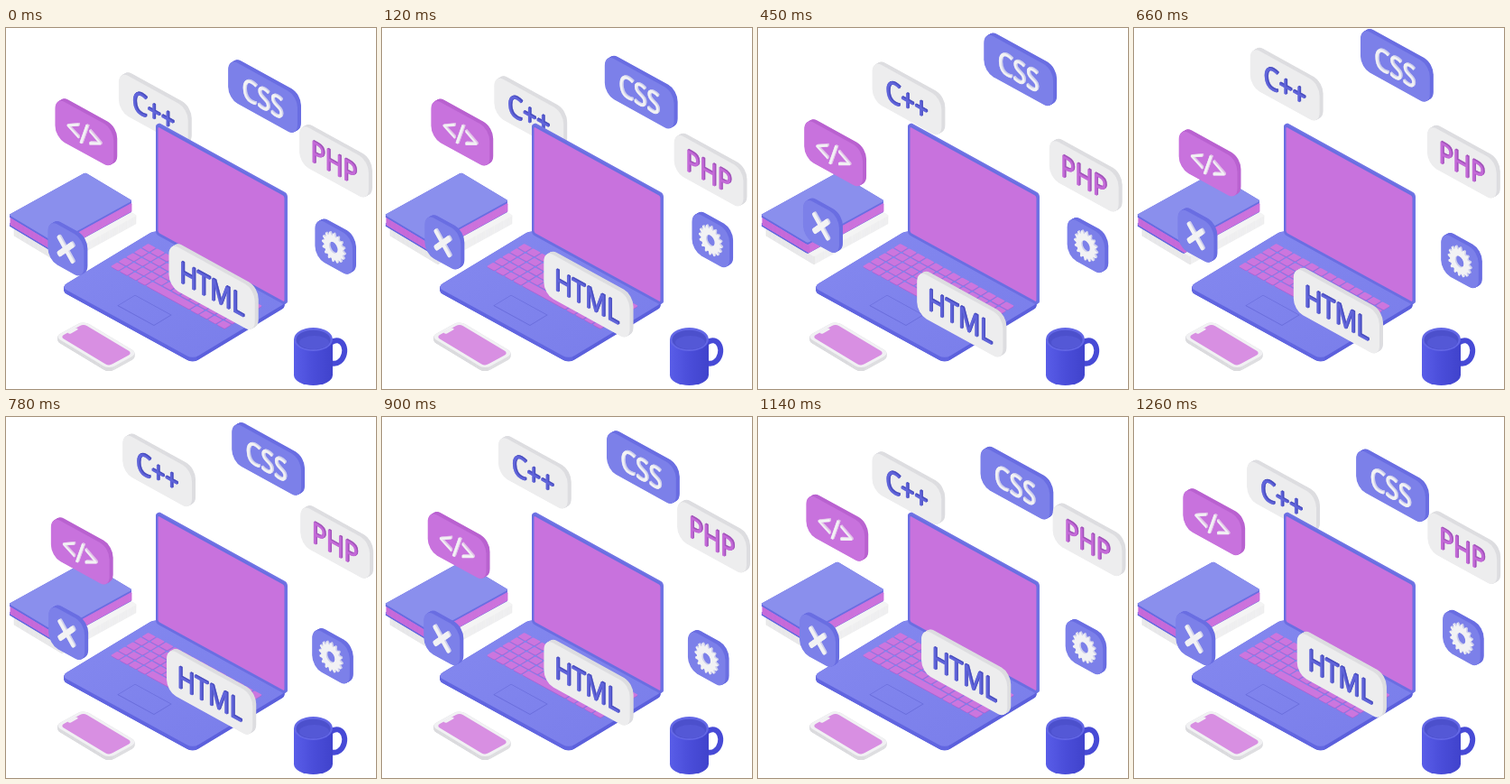
Recreate the animation shown at these times as an HTML page with a canvas. Size 410 by 400 pixels, loop 1290 ms.

```html
<!DOCTYPE html>
<html lang="en">
<head>
<meta charset="utf-8">
<title>Coding desk</title>
<style>
html, body { margin: 0; width: 100%; height: 100%; overflow: hidden; background: #fff; }
canvas { display: block; width: 410px; height: 400px; }
</style>
</head>
<body>
<canvas id="stage" width="410" height="400"></canvas>
<script>
const ctx = document.getElementById('stage').getContext('2d');
const LOOP = 1290, STEP = 30, TURN = Math.PI * 2;
const BLUE = '#7c80e9', BLUE_EDGE = '#6a6ee2', PINK = '#c872dd', WHITE = '#ededee';

function box(x, y, w, h, radius, fill) {
  ctx.beginPath();
  ctx.roundRect(x, y, w, h, radius);
  ctx.fillStyle = fill;
  ctx.fill();
}

function ellipse(x, y, rx, ry, fill) {
  ctx.beginPath();
  ctx.ellipse(x, y, rx, ry, 0, 0, TURN);
  ctx.fillStyle = fill;
  ctx.fill();
}

function blend(x0, x1, ...colors) {
  const gradient = ctx.createLinearGradient(x0, 0, x1, 0);
  colors.forEach((color, i) => gradient.addColorStop(i / (colors.length - 1), color));
  return gradient;
}

function within(matrix, draw) {
  ctx.save();
  ctx.transform(...matrix);
  draw();
  ctx.restore();
}

// Upright plane that recedes down to the right, centred on x, y.
const onWall = (x, y, draw) => within([0.8, 0.44, 0, 1, x, y], draw);

// Flat plane: u runs down to the right, v up to the right, from the left corner.
const DESK = [0.6, 0.55], LAPTOP = [0.547, 0.605];
const onFloor = (x, y, [down, up], draw) => within([1, down, 1, -up, x, y], draw);

// Repeats draw(color) from back to front to give it thickness.
function extrude(x, y, depth, face, edge, draw) {
  for (let d = depth; d > 0; d -= 0.5) onWall(x + d, y - d * 0.6, () => draw(edge));
  onWall(x, y, () => draw(face));
}

function tile(x, y, w, h, radius, depth, face, edge) {
  extrude(x, y, depth, face, edge, color => box(-w / 2, -h / 2, w, h, radius, color));
}

// Lying block; its two visible sides meet below the front corner.
function slab(x, y, u, v, height, slope, radius, top, left, right) {
  for (let z = height; z >= 0; z -= 0.5) {
    onFloor(x, y + z, slope, () => {
      box(0, 0, u, v, radius, right);
      ctx.clip();
      box(0, 0, u, radius + 1, radius, left);
    });
  }
  onFloor(x, y, slope, () => box(0, 0, u, v, radius, top));
}

const label = text => color => {
  ctx.font = '33px "Open Sans", "Noto Sans", sans-serif';
  ctx.textAlign = 'center';
  ctx.fillStyle = ctx.strokeStyle = color;
  ctx.lineWidth = 0.6;
  ctx.lineJoin = 'round';
  ctx.fillText(text, 0, 13);
  ctx.strokeText(text, 0, 13);
};

function cross(color) {
  for (const angle of [TURN / 8, -TURN / 8]) {
    ctx.save();
    ctx.rotate(angle);
    box(-15, -2.8, 30, 5.6, 2, color);
    ctx.restore();
  }
}

function gear(color) {
  const teeth = 16, points = teeth * 4;
  ctx.beginPath();
  for (let i = 0; i < points; i++) {
    const a = i / points * TURN;
    const r = i % 4 < 2 ? 16 : 13;
    ctx.lineTo(r * Math.cos(a), r * Math.sin(a));
  }
  ctx.closePath();
  ctx.moveTo(6, 0);
  ctx.arc(0, 0, 6, 0, TURN);
  ctx.fillStyle = color;
  ctx.fill('evenodd');
}

const blueSkin = { face: BLUE, edge: BLUE_EDGE, ink: '#f2f2f4', inkEdge: '#cfd0ec' };
const pinkSkin = { ...blueSkin, face: PINK, edge: '#b962d0', inkEdge: '#e2c4e8' };
const whiteSkin = { face: WHITE, edge: '#dddde0', ink: '#6165da', inkEdge: '#4a4ec0' };
const whitePinkSkin = { ...whiteSkin, ink: '#c46ad8', inkEdge: '#a254ba' };

// x, y: middle of the drift; low: time of the lowest point in ms.
const backPanel = { x: 165.2, y: 77.5, low: 145, w: 96, skin: whiteSkin, art: label('C++') };
const frontPanels = [
  { x: 287, y: 59.5, low: 1255, w: 96, skin: blueSkin, art: label('CSS') },
  { x: 363.3, y: 149.5, low: 335, w: 96, skin: whitePinkSkin, art: label('PHP') },
  { x: 84.5, y: 133.4, low: 700, w: 81, skin: pinkSkin, art: label('</>') },
  { x: 68, y: 234, low: 1085, w: 50, rise: 28, sharp: 1.6, skin: blueSkin, art: cross },
  { x: 362.2, y: 250.5, low: 880, w: 52, skin: blueSkin, art: gear },
  { x: 226.2, y: 301.5, low: 505, w: 119, h: 49, skin: whiteSkin, art: label('HTML') },
];

function drawPanel({ x, y, low, w, h = 45, rise = 35, sharp = 1, skin, art }, time) {
  const lift = ((1 - Math.cos((time - low) / LOOP * TURN)) / 2) ** sharp;
  const drift = rise * (0.5 - lift);
  const px = x - drift * 0.14, py = y + drift;
  tile(px, py, w, h, 13, 4, skin.face, skin.edge);
  extrude(px - 0.5, py, 1.5, skin.ink, skin.inkEdge, art);
}

function drawBooks() {
  slab(8, 221, 54, 83, 9, DESK, 1, '#f4f4f4', '#e2e2e4', '#efeff0');
  slab(3, 217, 52, 85, 2, DESK, 2, BLUE, '#5f63dc', BLUE_EDGE);
  slab(4, 210, 52, 84, 8, DESK, 1, PINK, '#c065d6', '#cc72dc');
  slab(3, 207, 52, 85, 2, DESK, 2, '#8a8fed', '#6468e0', BLUE_EDGE);
}

function drawKeys() {
  const rows = 5, cols = 13, keyW = 9.8, keyH = 8.6;
  for (let row = 0; row < rows; row++) {
    for (let col = 0; col < cols; col++) {
      const isSpace = row === 0 && col === 4;
      if (row === 0 && col > 4 && col < 9) continue;
      const u = 9 + col * keyW, v = 46 + row * keyH;
      const w = keyW * (isSpace ? 5 : 1) - 1.3;
      box(u + 0.6, v - 0.6, w, keyH - 1.3, 1, '#ac5fd0');
      box(u, v, w, keyH - 1.3, 1, '#cc76de');
    }
  }
}

function drawLaptop() {
  const [x, y] = [61, 287];
  slab(x, y, 146, 105, 4.5, LAPTOP, 6, blend(0, 240, '#8286ee', '#777be9'), '#6569e2', '#5c60dc');
  onFloor(x, y, LAPTOP, () => {
    drawKeys();
    ctx.strokeStyle = '#6a6edc';
    ctx.lineWidth = 0.8;
    ctx.strokeRect(51, 12, 40, 19);
  });
  tile(238, 206.5, 180, 123, 4, 2, BLUE_EDGE, '#7175e4');
  tile(238.5, 206.5, 175, 117, 2, 0, PINK);
}

function drawPhone() {
  slab(54, 342, 60, 32, 4, DESK, 6, '#f1f1f3', '#d8d8db', '#dedee1');
  onFloor(54, 342, DESK, () => {
    box(3, 3, 54, 26, 4, '#d88fe2');
    box(2.5, 11, 3, 10, 1.5, '#f1f1f3');
  });
}

function drawMug() {
  const x = 340.5, y = 345, rx = 21.5;
  ctx.beginPath();
  ctx.ellipse(365, 359, 10, 13, 0.25, 0, TURN);
  ctx.strokeStyle = '#474ad6';
  ctx.lineWidth = 6;
  ctx.stroke();
  const shade = blend(x - rx, x + rx, '#595de8', '#4a4dd9', '#4043cc');
  box(x - rx, y, rx * 2, 40, 0, shade);
  ellipse(x, y + 39.5, rx, 11.5, shade);
  ellipse(x, y, rx, 13, '#6367e6');
  ellipse(x, y + 0.5, 19, 10.8, '#4c50cc');
  ellipse(x + 1, y + 3.5, 16.5, 7.6, '#5458d6');
}

function render(elapsed) {
  const time = Math.floor((elapsed % LOOP) / STEP) * STEP;
  ctx.fillStyle = '#fff';
  ctx.fillRect(0, 0, 410, 400);
  drawBooks();
  drawPanel(backPanel, time);
  drawLaptop();
  drawPhone();
  drawMug();
  frontPanels.forEach(panel => drawPanel(panel, time));
}

let start;
function tick(now) {
  start ??= now;
  render(now - start);
  requestAnimationFrame(tick);
}
render(0);
requestAnimationFrame(tick);
</script>
</body>
</html>
```
